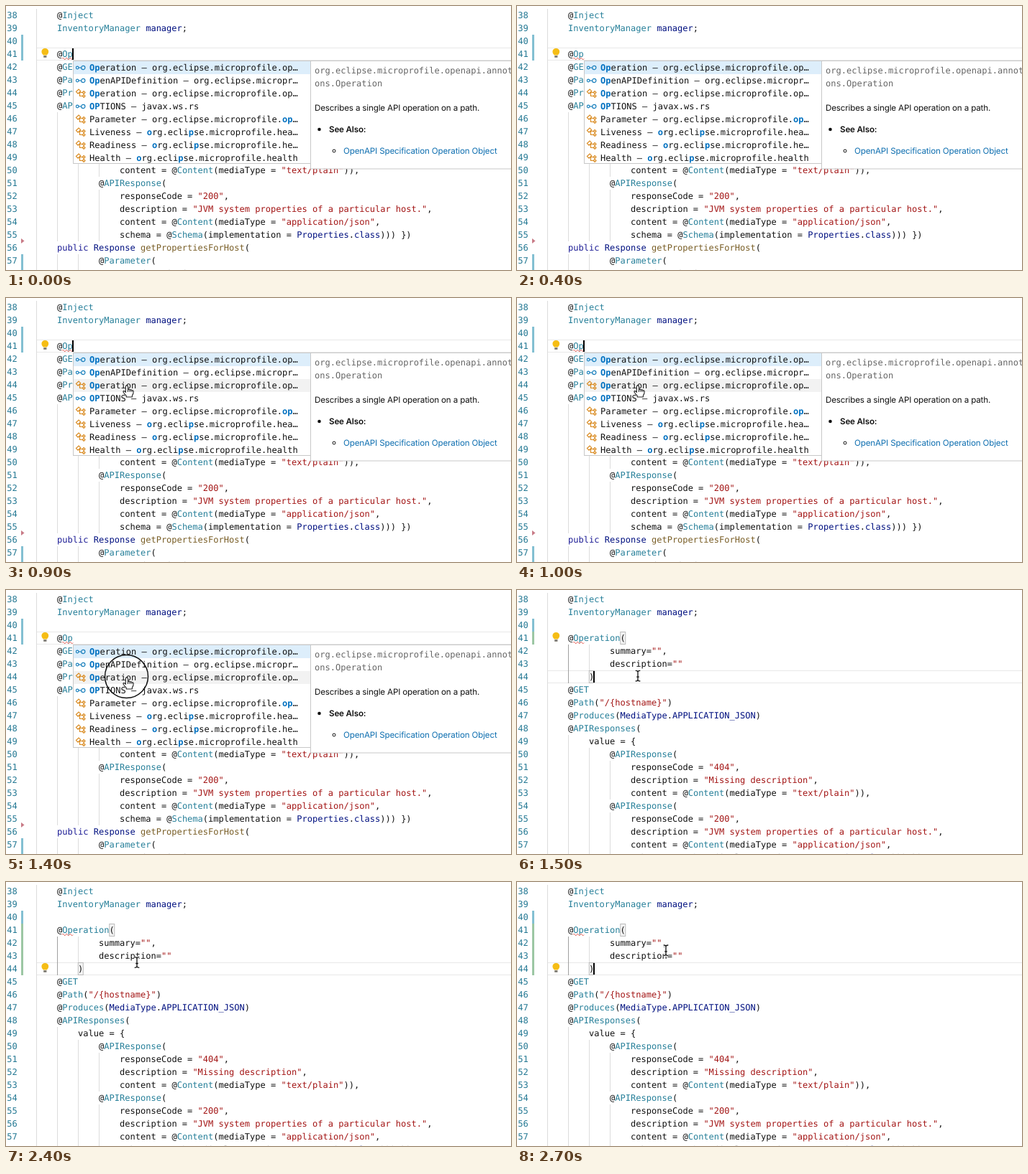
Animation of 702 by 368 pixels, one loop 2.8 s. Source, as an HTML page:

```html
<!DOCTYPE html>
<html lang="en">
<head>
<meta charset="utf-8">
<title>Code completion</title>
<style>
html, body { margin: 0; width: 100%; height: 100%; overflow: hidden; background: #fff; }
svg { display: block; width: 702px; height: 368px; }
text { font: 12.04px "DejaVu Sans Mono", monospace; white-space: pre; text-rendering: geometricPrecision; fill: #111; }
.num { fill: #237893; }
.type { fill: #267f99; }
.str { fill: #a31515; }
.var { fill: #001080; }
.key { fill: #1e1e96; }
.fn { fill: #795e26; }
.hit { fill: #0070c0; font-weight: bold; }
.path { fill: #666; }
.doc { font: 11.6px Inter, "Open Sans", sans-serif; letter-spacing: -.15px; }
.head { font-weight: 600; }
.link { fill: #0f6fb0; }
</style>
</head>
<body>
<svg id="stage" viewBox="0 0 702 368"></svg>
<script>
const STEP = 100, LOOP = 2800, LEFT = 42, CHAR = 7.248, ROW = 18, FIRST = 38;
const CHANGED = '#83c0d2', ADDED = '#9cc7a4';
const colX = c => LEFT + c * CHAR;
const rowY = n => 4 + (n - FIRST) * ROW;

const rect = (x, y, w, h, fill, more = '') =>
  `<rect x="${x}" y="${y}" width="${w}" height="${h}" fill="${fill}" ${more}/>`;
const text = (x, y, body, cls = '') => `<text x="${x}" y="${y}" class="${cls}">${body}</text>`;
const span = (cls, s) => `<tspan class="${cls}">${s}</tspan>`;
const group = (id, body) => `<g id="${id}">${body}</g>`;

const rules = [
  ['str', /^"[^"]*"?/], ['type', /^InventoryManager\b/],
  ['var', /^(manager|MediaType|APPLICATION_JSON|Properties|class|Response)\b/],
  ['key', /^public\b/], ['fn', /^getPropertiesForHost/],
];

function paint(src) {
  let out = '';
  while (src) {
    const note = src.match(/^@(\w+)/);
    if (note) {
      out += '@' + span('type', note[1]);
      src = src.slice(note[0].length);
      continue;
    }
    const rule = rules.find(r => r[1].test(src));
    const s = rule ? src.match(rule[1])[0] : src.match(/^(\w+|.)/)[0];
    out += rule ? span(rule[0], s) : s;
    src = src.slice(s.length);
  }
  return out;
}

// Each entry is [column, source]
const lines = (from, rows) => rows.map(([c, s], i) =>
  text(colX(c), rowY(from + i) + 13.3, paint(s))).join('');
const guide = (c, from, to, color = '#dcdcdc') =>
  rect(Math.round(colX(c)), rowY(from), 1, (to - from + 1) * ROW, color);
const bar = (from, to, color) => rect(21, rowY(from), 3, (to - from + 1) * ROW, color);
const activeLine = n => rect(42.5, rowY(n) + .5, 670, 17, 'none', 'stroke="#e8e8e8"');

const intro = [[4, '@Inject'], [4, 'InventoryManager manager;']];
const method = [
  [4, '@GET'], [4, '@Path("/{hostname}")'], [4, '@Produces(MediaType.APPLICATION_JSON)'],
  [4, '@APIResponses('], [8, 'value = {'],
  [12, '@APIResponse('], [16, 'responseCode = "404",'],
  [16, 'description = "Missing description",'],
  [16, 'content = @Content(mediaType = "text/plain")),'],
  [12, '@APIResponse('], [16, 'responseCode = "200",'],
  [16, 'description = "JVM system properties of a particular host.",'],
  [16, 'content = @Content(mediaType = "application/json",'],
  [16, 'schema = @Schema(implementation = Properties.class))) })'],
  [4, 'public Response getPropertiesForHost('], [12, '@Parameter('], [20, 'description = "'],
];

const methodGuides = n => guide(4, n + 4, n + 13) + guide(8, n + 5, n + 13) +
  guide(12, n + 6, n + 8) + guide(12, n + 10, n + 13);

const squiggle = `<path d="M78 73.5${'q1.25 -2.6 2.5 0t2.5 0'.repeat(3)}" fill="none" stroke="#e0483e" stroke-width="1"/>`;

const bulb = `<g id="bulb"><path d="M51.8 68.5Q49.3 66.5 49.4 63.8A4.9 4.9 0 0 1 59.2 63.8Q59.3 66.5 56.8 68.5Z" fill="#f5bd15"/>
  <path d="M52.2 69.2h4.2v2.6h-4.2z" fill="#77736a"/></g>`;

// Completion list: icon kind, then label with matches in brackets
const items = [
  ['i', '[Op]eration – org.eclipse.microprofile.op…'],
  ['i', '[Op]enAPIDefinition – org.eclipse.micropr…'],
  ['c', '[Op]eration – org.eclipse.microprofile.op…'],
  ['i', '[OP]TIONS – javax.ws.rs'],
  ['c', 'Parameter – org.eclipse.microprofile.[op]…'],
  ['c', 'Liveness – [o]rg.ecli[p]se.microprofile.hea…'],
  ['c', 'Readiness – [o]rg.ecli[p]se.microprofile.he…'],
  ['c', 'Health – [o]rg.ecli[p]se.microprofile.health'],
];
const icons = {
  i: '<g fill="none" stroke="#1b80bd" stroke-width="1.2"><circle cx="99.2" r="1.8"/><path d="M101 0h3.6"/><circle cx="107.3" r="2.6"/></g>',
  c: '<g fill="none" stroke="#d98a1f" stroke-width="1.2"><path d="M97.5 -2.5l3.6 -3.4 2.6 2.6 -3.6 3.4zM102.5 -1.5h4M102.5 -1.5v5h4"/><path d="M106.3 -1.5l1.8 -1.8 1.9 1.9 -1.8 1.8zM106.3 3.5l1.8 -1.8 1.9 1.9 -1.8 1.8z"/></g>',
};
const list = rect(93.5, 76.5, 330, 143, '#fff', 'stroke="#c8c8c8"') +
  rect(94, 77, 329, 18, '#ddeefb') + rect(94, 95, 329, 18, '#f2f2f2', 'id="hover"') +
  items.map(([kind, label], i) => `<g transform="translate(0 ${86 + i * ROW})">${icons[kind]}` +
    text(116, 4.2, label.replace(/\[(\w+)\]/g, (m, s) => span('hit', s))) + '</g>').join('');
const docs = rect(423.5, 76.5, 290, 150.5, '#fff', 'stroke="#c8c8c8"') +
  text(429, 94.2, 'org.eclipse.microprofile.openapi.annotati', 'path') +
  text(429, 112.2, 'ons.Operation', 'path') +
  text(429, 146.3, 'Describes a single API operation on a path.', 'doc') +
  '<circle cx="435.5" cy="172" r="2.3" fill="#111"/>' +
  text(449, 176.2, 'See Also:', 'doc head') +
  '<circle cx="456" cy="202" r="2" fill="none" stroke="#111"/>' +
  text(469, 206.2, 'OpenAPI Specification Operation Object', 'doc link');

const before = group('before', activeLine(41) +
  guide(0, 38, 58) + methodGuides(42) + guide(4, 57, 58) + guide(8, 57, 58) +
  bar(57, 58, CHANGED) + '<path d="M21 324l4.5 3.5 -4.5 3.5z" fill="#c87a86"/>' +
  lines(38, intro) + lines(41, [[4, '@Op']]) + lines(42, method) + list + docs);

const box = (c, n) => rect(colX(c) + .3, rowY(n) + .5, 7, 17, '#f4f4f4', 'stroke="#bbb"');
const after = group('after', activeLine(44) +
  guide(0, 38, 58) + guide(4, 42, 44, '#a0a0a0') + guide(8, 42, 43) + methodGuides(45) +
  bar(41, 41, ADDED) + group('added', bar(42, 44, ADDED)) + box(14, 41) + box(8, 44) +
  lines(38, intro) +
  lines(41, [[4, '@Operation('], [12, 'summary="",'], [12, 'description=""'], [8, ')']]) +
  lines(45, method.slice(0, 14)));

const numbers = Array.from({ length: 21 }, (_, i) =>
  text(1.3, rowY(FIRST + i) + 13.3, FIRST + i, 'num')).join('');

const hand = `<path id="hand" d="M-1.6 .8Q0 -1 1.5 .8V6Q3 4.8 4.3 6.2Q5.8 5.3 6.9 6.8Q9 6.3 9.2 8.6Q9.2 12 7.4 13.8V16H-.8V14.2Q-4 11.5 -5.2 8.6Q-4.6 6.9 -2.8 8.2L-1.6 9.4ZM1.5 6V9M4.3 6.2V9M6.9 6.8V9" fill="#fff" stroke="#222" stroke-width="1.1" stroke-linejoin="round"/>`;
const beamPath = 'M-3.3 -7.3Q-.4 -7.3 0 -5.6Q.4 -7.3 3.3 -7.3M0 -5.6V5.6M-3.3 7.3Q-.4 7.3 0 5.6Q.4 7.3 3.3 7.3M-1.8 1.5H1.8';
const beam = `<g id="beam" fill="none"><path d="${beamPath}" stroke="#fff" stroke-width="3.4"/><path d="${beamPath}" stroke="#111" stroke-width="1.3"/></g>`;

document.getElementById('stage').innerHTML = rect(0, 0, 702, 368, '#fff') + numbers +
  bar(40, 41, CHANGED) + before + after + squiggle + bulb +
  rect(0, 0, 2, 16, '#000', 'id="caret"') +
  '<circle id="ring" cx="167.5" cy="120.5" fill="none" stroke="#111" stroke-width="1.5"/>' + hand + beam;

const el = id => document.getElementById(id);
const show = (id, on) => el(id).setAttribute('display', on ? 'inline' : 'none');
const move = (id, x, y) => el(id).setAttribute('transform', `translate(${x} ${y})`);

// Position along [time, x, y] points
function along(points, t) {
  const i = points.findIndex(p => p[0] > t);
  if (i < 0) return points[points.length - 1].slice(1);
  if (!i) return points[0].slice(1);
  const a = points[i - 1], b = points[i], k = (t - a[0]) / (b[0] - a[0]);
  return [a[1] + (b[1] - a[1]) * k, a[2] + (b[2] - a[2]) * k];
}
const handMove = [[500, 128, 94], [700, 148.5, 118.5], [900, 168, 122]];
const beamMove = [[2200, 168, 119.7], [2400, 182, 112], [2600, 203, 98], [2700, 207, 95.3]];

function draw(t) {
  const done = t >= 1500;
  show('before', !done);
  show('after', done);
  show('added', t >= 1800);
  move('bulb', 0, t >= 1800 ? 54 : 0);

  const blink = done ? (t - 1500) % 1000 < 500 : (t + 100) % 1000 < 500;
  show('caret', blink);
  el('caret').setAttribute('x', done ? 106 : 92);
  el('caret').setAttribute('y', done ? 113 : 59);

  show('hand', t >= 500 && !done);
  move('hand', ...along(handMove, t));
  show('hover', t >= 500 && !done);
  el('hover').setAttribute('y', t >= 800 ? 113 : 95);
  show('ring', t >= 1300 && !done);
  el('ring').setAttribute('r', t >= 1400 ? 30 : 17);
  show('beam', done);
  move('beam', ...along(beamMove, t));
}

const start = performance.now();
function tick() {
  const t = (performance.now() - start) % LOOP;
  draw(Math.floor(t / STEP) * STEP);
  requestAnimationFrame(tick);
}
tick();
</script>
</body>
</html>
```
